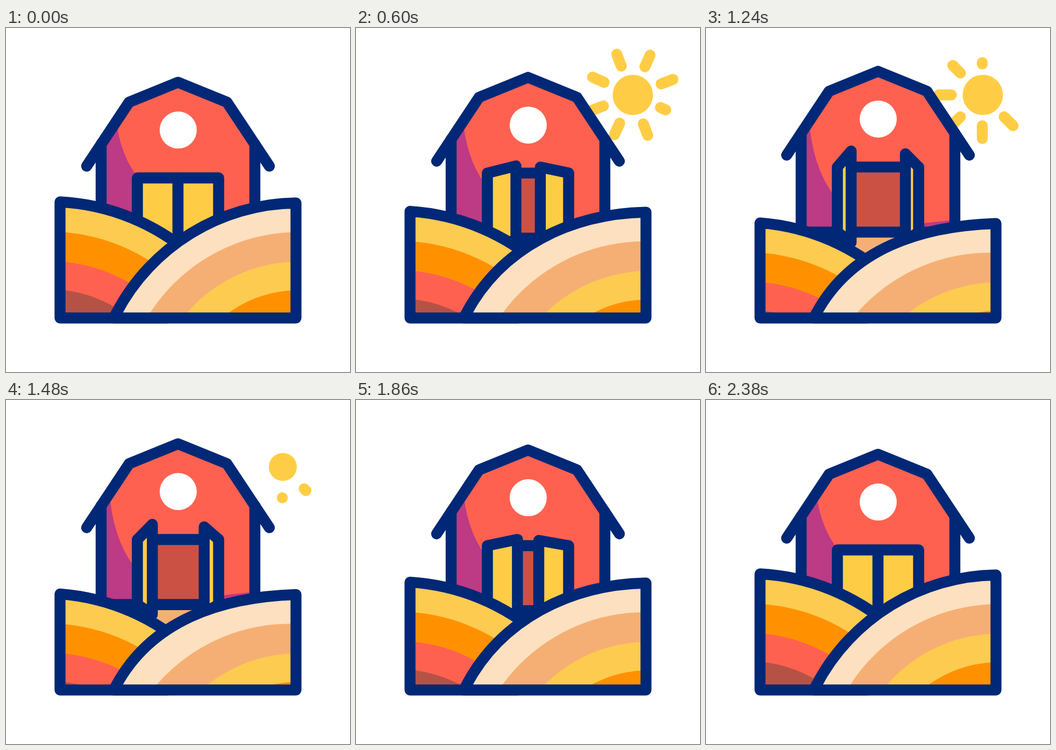
Recreate the animation shown at these times as an HTML page with a canvas. Size 640 px wide and 640 px high, loop 2.4 s.

```html
<!DOCTYPE html>
<html lang="en">
<head>
<meta charset="utf-8">
<title>Barn</title>
<style>
  html, body { margin: 0; width: 100%; height: 100%; overflow: hidden; background: #fff; }
  canvas { display: block; width: 640px; height: 640px; }
</style>
</head>
<body>
<canvas id="stage" width="640" height="640"></canvas>
<script>
const ctx = document.getElementById('stage').getContext('2d');
const LOOP = 2400, TAU = Math.PI * 2, LINE = 20.4;
const NAVY = '#002876', RED = '#ff6150', PURPLE = '#bd3a84', GOLD = '#ffcd45',
      BROWN = '#cc5145', PEACH = '#f5af74', CORN = '#fccb50', ORANGE = '#ff9100';

const clamp = v => Math.min(1, Math.max(0, v));
const mix = (a, b, k) => a + (b - a) * k;
const smooth = u => u * u * (3 - 2 * u);

// Symmetric cubic-bezier(a, 0, 1 - a, 1)
function ease(x, a = 0.69) {
  x = clamp(x);
  let lo = 0, hi = 1;
  for (let i = 0; i < 24; i++) {
    const s = (lo + hi) / 2, q = 1 - s;
    if (3 * q * q * s * a + 3 * q * s * s * (1 - a) + s * s * s < x) lo = s; else hi = s;
  }
  return smooth((lo + hi) / 2);
}

function poly(points, close) {
  ctx.beginPath();
  points.forEach(([x, y]) => ctx.lineTo(x, y));
  if (close) ctx.closePath();
}

function fill(color) {
  ctx.fillStyle = color;
  ctx.fill();
}

function stroke(color = NAVY) {
  ctx.strokeStyle = color;
  ctx.stroke();
}

function disc(x, y, r, color) {
  ctx.beginPath();
  ctx.arc(x, y, r, 0, TAU);
  fill(color);
}

function drawSun(t) {
  const size = ease((t - 120) / 240) * (1 - ease((t - 1390) / 210));
  if (size > 0.001) disc(515, 124.5, 37.5 * size, GOLD);
  const turn = -45 * (1 - smooth(clamp((t - 208) / 750)));
  const span = 144, gap = 50;
  for (let i = 0; i < 8; i++) {
    const born = 181 + i * gap, gone = 1042 + i * gap;
    if (t < born || t > gone + span + 4) continue;
    const length = 23.5 * ease((t - born) / span) * (1 - ease((t - gone) / span));
    const angle = (turn - 45 * i) * Math.PI / 180;
    const at = r => [514 + r * Math.cos(angle), 124.5 + r * Math.sin(angle)];
    poly([at(57.5), at(57.5 + length + 0.01)]);
    stroke(GOLD);
  }
}

function drawLeaf(hinge, edge, top, bottom, lift) {
  poly([[hinge, 279 - lift], [edge, top], [edge, bottom], [hinge, 400 - lift]], true);
  fill(GOLD);
  stroke();
}

function drawBarn(p) {
  const lift = 20.4 * p, floor = 400 - lift;
  const roof = [[150, 257], [229, 138], [320, 101], [411, 138], [490, 257]]
    .map(([x, y]) => [x, y - lift]);
  const body = [[177, floor], [177, 216 - lift], ...roof.slice(1, 4),
                [463, 216 - lift], [463, floor]];

  ctx.save();
  poly(body, true);
  fill(RED);
  ctx.clip();
  ctx.beginPath();
  ctx.moveTo(mix(204, 191, p), 160);
  ctx.quadraticCurveTo(mix(209, 196, p), mix(226, 258, p), 240, mix(271, 314, p));
  ctx.quadraticCurveTo(290, mix(350, 368, p), 406, 363);
  ctx.lineTo(463, mix(350, 357, p));
  ctx.lineTo(463, 420);
  ctx.lineTo(160, 420);
  ctx.lineTo(160, 160);
  fill(PURPLE);
  ctx.restore();

  disc(320.4, 189.8 - lift, 34.5, '#fff');

  ctx.fillStyle = PEACH;
  ctx.fillRect(272, floor, 96, 45);
  poly([[177, 216 - lift], [177, floor], [463, floor], [463, 216 - lift]]);
  stroke();
  poly(roof);
  stroke();

  poly([[244.5, 279 - lift], [395.5, 279 - lift], [395.5, floor], [244.5, floor]], true);
  fill(BROWN);
  stroke();
  drawLeaf(244.5, 320 - 50 * p, 279 - 50 * p, 399, lift);
  drawLeaf(395.5, 320 + 51 * p, 279 - 45 * p, 396, lift);
}

function drawLeftHill(p) {
  const drop = 38.5 * p, cx = 80 - 10 * p, cy = 728 + drop, r = 405;
  const from = -Math.acos((100.5 - cx) / r), to = -Math.acos((345 - cx) / r);
  ctx.save();
  ctx.beginPath();
  ctx.arc(cx, cy, r, from, to);
  ctx.lineTo(345, 539.5);
  ctx.lineTo(100.5, 539.5);
  fill(CORN);
  ctx.clip();
  disc(80 - 4 * p, cy, 349.3, ORANGE);
  disc(80, cy, 294.5, RED);
  disc(80, cy, 241.9, '#b55246');
  ctx.restore();
  ctx.beginPath();
  ctx.arc(cx, cy, r, to, from, true);
  ctx.lineTo(100.5, 539.5);
  ctx.lineTo(300, 539.5);
  stroke();
}

function drawRightHill(p) {
  const drop = 38.2 * p;
  ctx.save();
  ctx.beginPath();
  ctx.moveTo(200.5, 539.5);
  ctx.lineTo(205, 531);
  ctx.bezierCurveTo(270, 406.4 + 4.6 * p, 399, 327 + 41 * p, 539.5, 325.5 + drop);
  ctx.lineTo(539.5, 539.5);
  ctx.closePath();
  const edge = () => stroke();
  fill('#fce0bf');
  ctx.save();
  ctx.clip();
  const path = [[544 - 16 * p, 328.3, PEACH], [544, 273.2, CORN], [544, 220.3, ORANGE]];
  path.forEach(([x, r, color]) => disc(x, 708 + drop, r, color));
  ctx.restore();
  ctx.beginPath();
  ctx.moveTo(200.5, 539.5);
  ctx.lineTo(205, 531);
  ctx.bezierCurveTo(270, 406.4 + 4.6 * p, 399, 327 + 41 * p, 539.5, 325.5 + drop);
  ctx.lineTo(539.5, 539.5);
  ctx.closePath();
  edge();
  ctx.restore();
}

function draw(t) {
  ctx.fillStyle = '#fff';
  ctx.fillRect(0, 0, 640, 640);
  ctx.lineWidth = LINE;
  ctx.lineCap = ctx.lineJoin = 'round';
  const half = LOOP / 2, phase = (t - 20 + LOOP) % LOOP;
  const p = ease(phase < half ? phase / half : (LOOP - phase) / half);
  drawSun(t);
  drawBarn(p);
  drawLeftHill(p);
  drawRightHill(p);
}

function tick() {
  draw(performance.now() % LOOP);
  requestAnimationFrame(tick);
}
tick();
</script>
</body>
</html>
```
